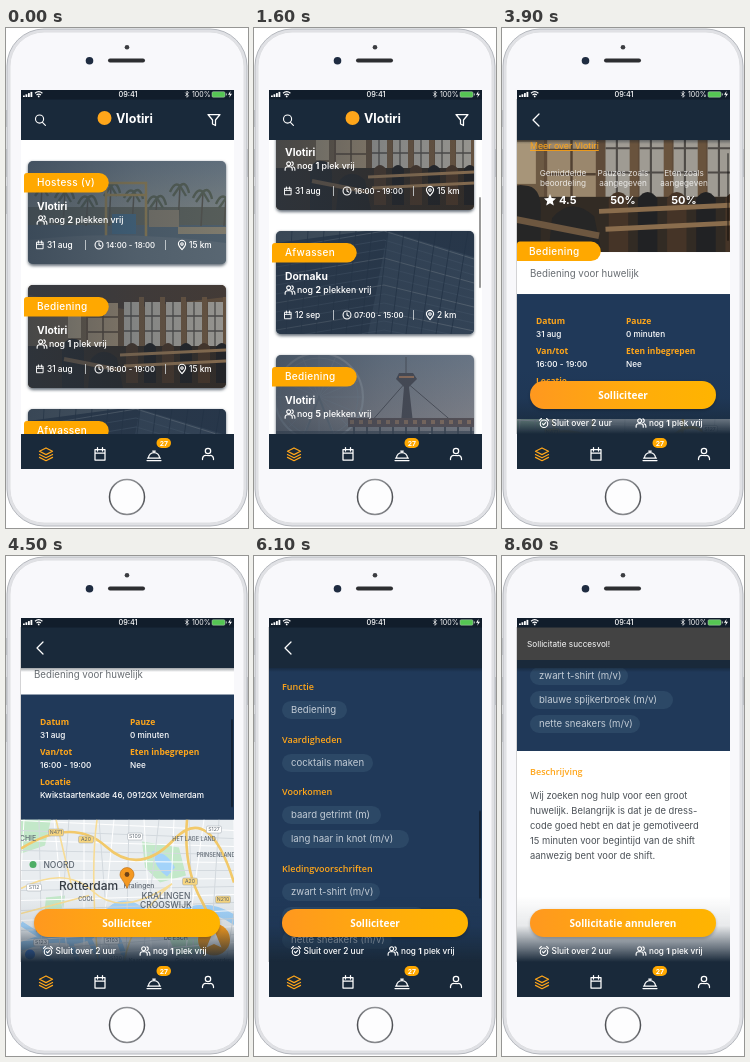
Recreate the animation shown at these times as an HTML page. Size 242 px wide and 500 px high, loop 8.7 s.

```html
<!DOCTYPE html>
<html lang="nl">
<head>
<meta charset="utf-8">
<title>Diensten-app</title>
<style>
@property --list { syntax: "<number>"; inherits: true; initial-value: 0; }
@property --page { syntax: "<number>"; inherits: true; initial-value: 0; }
html, body { margin: 0; width: 100%; height: 100%; overflow: hidden; background: #fff; }
svg { display: block; width: 242px; height: 500px; font: 400 8.3px Inter, sans-serif; fill: #fff;
  animation: list 8.7s linear infinite, page 8.7s linear infinite; }
.b { font-weight: 700; }
.m { font-weight: 500; }
.mid { text-anchor: middle; }
.line { fill: none; stroke: #fff; stroke-width: 1.2; stroke-linecap: round; stroke-linejoin: round; }
.orange { fill: #ffa800; }
.label { font: 700 8.5px "Open Sans", sans-serif; fill: #ffa61a; }
.head { font: 600 9px "Open Sans", sans-serif; fill: #ffa61a; }
.action { font: 700 10px "Open Sans", sans-serif; text-anchor: middle; }
.chip { font-size: 9.6px; fill: #c3ccd6; }
.prose { font-size: 9.4px; fill: #4b5157; }
.ribbon { font-size: 10px; font-weight: 500; letter-spacing: .3px; }
.place { fill: #5d6670; }
#cards { transform: translateY(calc(var(--list) * -1px)); }
#listBar { transform: translateY(calc(max(0, var(--list)) * .315px)); animation: listBar 8.7s linear infinite; }
#pageBar { transform: translateY(calc(var(--page) * .3px)); animation: pageBar 8.7s linear infinite; }
#scroll { transform: translateY(calc(var(--page) * -1px)); }
#detail { animation: enter 8.7s linear infinite; }
#apply { animation: apply 8.7s step-end infinite; }
#cancel { animation: cancel 8.7s step-end infinite; }
#press { animation: press 8.7s linear infinite; }
#toast { animation: toast 8.7s linear infinite; }
@keyframes list {
  0%, 2.3% { --list: 0; }
  6.9% { --list: 110; }
  11.5% { --list: 240; }
  14.94% { --list: 250; }
  18.39% { --list: 178; }
  22.99% { --list: 45; }
  26.44% { --list: -14; }
  27.59% { --list: -17; }
  29.9% { --list: -5; }
  31.5%, 100% { --list: 0; }
}
@keyframes page {
  0%, 41.38% { --page: 0; }
  44.83% { --page: 40; }
  49.43% { --page: 120; }
  54.02% { --page: 215; }
  59.77% { --page: 289; }
  63.22% { --page: 335; }
  70.11% { --page: 472; }
  74.71% { --page: 570; }
  79.31% { --page: 665; }
  82.8%, 100% { --page: 688; }
}
@keyframes listBar { 0%, 2.3% { opacity: 0; } 4%, 29% { opacity: 1; } 33%, 100% { opacity: 0; } }
@keyframes pageBar { 0%, 42% { opacity: 0; } 44%, 82% { opacity: 1; } 86%, 100% { opacity: 0; } }
@keyframes enter {
  0%, 34.48% { transform: translateX(214px); animation-timing-function: cubic-bezier(.2, .7, .3, 1); }
  39.1%, 100% { transform: none; }
}
@keyframes apply { 0% { opacity: 1; } 90.8%, 100% { opacity: 0; } }
@keyframes cancel { 0% { opacity: 0; } 90.8%, 100% { opacity: 1; } }
@keyframes press { 0%, 85% { opacity: 0; } 86.5%, 88% { opacity: .2; } 90.8%, 100% { opacity: 0; } }
@keyframes toast {
  0%, 90.7% { transform: translateY(-34px); animation-timing-function: ease-out; }
  94.3%, 100% { transform: none; }
}
</style>
</head>
<body>
<svg id="stage" viewBox="0 0 242 500"></svg>
<script>
const NAVY = '#19293a', BLUE = '#203959', BRAND = 'Vlotiri';

const range = (n, draw) => Array.from({ length: n }, (_, i) => draw(i)).join('');
const rect = (x, y, w, h, fill, more = '') => `<rect x="${x}" y="${y}" width="${w}" height="${h}" fill="${fill}" ${more}/>`;
const circle = (x, y, r, fill, more = '') => `<circle cx="${x}" cy="${y}" r="${r}" fill="${fill}" ${more}/>`;
const path = (d, more = 'class="line"') => `<path d="${d}" ${more}/>`;
const stroke = (d, color, width = 1) => path(d, `fill="none" stroke="${color}" stroke-width="${width}"`);
const text = (x, y, str, cls = '', more = '') => `<text x="${x}" y="${y}" class="${cls}" ${more}>${str}</text>`;
const group = (x, y, body, scale = 1, more = '') => `<g transform="translate(${x} ${y}) scale(${scale})" ${more}>${body}</g>`;
const bold = str => `<tspan font-weight="700">${str}</tspan>`;

// Icons are centred on their own origin.
const icons = {
  search: 'M3 3L6 6M4-1A4.5 4.5 0 1 1-5-1A4.5 4.5 0 1 1 4-1',
  filter: 'M-6-5.5H6L1.5 0V5.5L-1.5 4V0Z',
  back: 'M3-6L-3 0L3 6',
  calendar: 'M-5-4.5H5V6H-5ZM-5-1H5M-2.5-6.5V-3M2.5-6.5V-3',
  clock: 'M5.5 0A5.5 5.5 0 1 1-5.5 0A5.5 5.5 0 1 1 5.5 0M0-3V0L2.5 1.5',
  timer: 'M5 1A5 5 0 1 1-5 1A5 5 0 1 1 5 1M-2 1L-.5 2.5L2.2-.5M-6-3.5L-3.5-6M6-3.5L3.5-6',
  pin: 'M0 6.5C-3 3-5 1-5-1.5A5 5 0 0 1 5-1.5C5 1 3 3 0 6.5ZM1.7-1.5A1.7 1.7 0 1 1-1.7-1.5A1.7 1.7 0 1 1 1.7-1.5',
  users: 'M-6.5 5.5V4A3 3 0 0 1-3.5 1H0A3 3 0 0 1 3 4V5.5M.8-3A2.6 2.6 0 1 1-4.4-3A2.6 2.6 0 1 1 .8-3M2.5-5.5A2.6 2.6 0 0 1 2.5-.5M4.5 1.2A3 3 0 0 1 6.5 4V5.5',
  user: 'M-5.5 5.5V4.5A3.5 3.5 0 0 1-2 1.5H2A3.5 3.5 0 0 1 5.5 4.5V5.5M2.7-3A2.7 2.7 0 1 1-2.7-3A2.7 2.7 0 1 1 2.7-3',
  layers: 'M0-6L6.5-2.7L0 .6L-6.5-2.7ZM-6.5 .5L0 3.8L6.5 .5M-6.5 3.4L0 6.7L6.5 3.4',
  bell: 'M-6.5 3H6.5M-5.5 3A5.5 5.5 0 0 1 5.5 3M-7 5.5H7M0-2.5V-4M-1.3-4H1.3'
};
const icon = (name, x, y, scale = 1, color = '#fff') =>
  group(x, y, path(icons[name], `class="line" style="stroke:${color};stroke-width:${scale < .8 ? 1.5 : 1.25}"`), scale);

// Muted scenes, 198 by 103.
const pool = () => rect(0, 0, 198, 103, 'url(#sky)') +
  rect(0, 46, 198, 20, '#65695f') + rect(0, 64, 198, 39, '#596a76') +
  range(9, i => {
    const x = 12 + i * 23, y = 25 + i % 3 * 6;
    return stroke(`M${x} 65L${x + 2} ${y}`, '#5c584e', 1.5) +
      stroke(`M${x - 8} ${y + 6}Q${x - 3} ${y - 5} ${x + 2} ${y}Q${x + 8} ${y - 6} ${x + 11} ${y + 7}M${x - 5} ${y + 10}L${x + 2} ${y}L${x + 8} ${y + 10}`, '#5d6656', 2.4);
  }) +
  stroke('M78 82V22H118V82M78 34H118', '#a18a55', 2.5) +
  rect(84, 53, 24, 20, '#49708b') + rect(121, 49, 30, 17, '#8c8371') +
  path('M0 79Q90 68 198 82V103H0Z', 'fill="#687680"') + rect(150, 66, 48, 7, '#9a9078');

const room = () => rect(0, 0, 198, 103, '#6b5138') + path('M0 0H198V12L96 24L0 10Z', 'fill="#4b3b30"') +
  rect(0, 12, 58, 60, '#7c6345') + rect(60, 18, 30, 44, '#b39a78') +
  range(5, i => rect(96 + i * 21, 17, 15, 44, '#b9b2a6') + rect(111 + i * 21, 12, 5, 52, '#775a3d') +
    stroke(`M${103 + i * 21} 17V61M${96 + i * 21} 31H${111 + i * 21}M${96 + i * 21} 46H${111 + i * 21}`, '#564f48', 1.3)) +
  stroke('M75 18V62M60 32H90M60 47H90', '#5a4430', 1.5) +
  rect(40, 27, 13, 26, '#c3ab86') + rect(0, 61, 198, 42, '#34291f') +
  path('M34 103V66Q36 52 46 54Q57 54 56 72V103ZM60 103L63 74Q75 60 89 73L95 103Z', 'fill="#262321"') +
  range(6, i => path(`M${98 + i * 18} 98V62Q${104 + i * 18} 54 ${110 + i * 18} 62V98`, `fill="${i % 2 ? '#201e1e' : '#4b3422'}"`)) +
  stroke('M92 70L198 65M96 81L198 76', '#a07a50', 3) + stroke('M36 74L92 85', '#7c5f41', 4);

const office = () => rect(0, 0, 198, 103, '#52606d') + path('M0 12L90 0H198V103H0Z', 'fill="#26364a"') +
  path('M112 0L198 26V103H92Z', 'fill="#35465a"') +
  range(12, i => stroke(`M0 ${18 + i * 9}L108 ${i * 9}L198 ${28 + i * 8}`, i % 3 ? '#45566a' : '#677480', .8)) +
  range(13, i => stroke(`M${i * 16} 0L${i * 15 - 5} 103`, '#203044', .8));

const pier = () => rect(0, 0, 198, 103, 'url(#dusk)') +
  circle(43, 42, 44, 'none', 'stroke="#a3aab3" stroke-width="2"') + circle(43, 42, 39, 'none', 'stroke="#8b95a0"') +
  range(16, i => {
    const a = i * Math.PI / 8;
    return stroke(`M43 42L${43 + 43 * Math.cos(a)} ${42 + 43 * Math.sin(a)}`, '#929ba6', .7);
  }) +
  stroke('M20 103L43 42L66 103', '#7c8590', 2) +
  stroke('M130 2V20M94 68L130 27L178 68', '#55565e') +
  path('M125 68L128 32L120 24L123 18H137L141 24L133 32L137 68Z', 'fill="#51515a"') +
  stroke('M123 22H138', '#b08062', 2) +
  rect(72, 63, 126, 9, '#60565a') + range(14, i => rect(74 + i * 9, 65, 4, 4, '#957966')) +
  range(10, i => stroke(`M${78 + i * 13} 72V86`, '#39424f', 1.5)) + path('M0 76H198V103H0Z', 'fill="#3c4856" opacity=".65"');

const ribbon = (x, y, w, str, textX) =>
  path(`M${x} ${y + 3}Q${x} ${y} ${x + 3} ${y}H${x + w - 10}A9.5 9.5 0 0 1 ${x + w - 10} ${y + 19.5}H${x}Z`, 'class="orange"') +
  text(textX, y + 13, str, 'ribbon');

const jobs = [
  ['Hostess (v)', BRAND, 2, '31 aug', '14:00 - 18:00', 15, pool],
  ['Bediening', BRAND, 1, '31 aug', '16:00 - 19:00', 15, room],
  ['Afwassen', 'Dornaku', 2, '12 sep', '07:00 - 15:00', 2, office],
  ['Bediening', BRAND, 5, '14 sep', '17:00 - 23:00', 15, pier],
  ['Bediening', BRAND, 3, '15 sep', '16:00 - 22:00', 15, room]
];
const spots = n => `nog ${bold(n)} ${n > 1 ? 'plekken' : 'plek'} vrij`;
const card = ([role, firm, free, day, hours, km, scene], i) => group(0, 133 + i * 124,
  rect(22, 1, 198, 104, '#68717a', 'rx="5" filter="url(#soft)"') +
  group(22, 0, scene() + rect(0, 0, 198, 103, 'url(#shade)'), 1, 'clip-path="url(#cardClip)"') +
  ribbon(18, 12, 85, role, 31) +
  text(31, 49, firm, 'b', 'font-size="10.3"') +
  icon('users', 36, 59, .75) + text(43, 62, spots(free), 'm', 'font-size="8.8"') +
  icon('calendar', 34, 84, .62) + text(41, 87, day, 'm') +
  icon('clock', 93, 84, .72) + text(100, 87, hours, 'm', 'font-size="7.8"') +
  icon('pin', 176, 84, .72) + text(183, 87, km + ' km', 'm') +
  stroke('M79.5 79V89M159.5 79V89', '#d7dce0', .8));

const scrollbar = (id, height) => `<g id="${id}">${rect(225, 113, 2, height, '#000', 'rx="1" opacity=".4"')}</g>`;
const header = rect(15, 71, 213, 41, NAVY);
const listView = rect(15, 112, 213, 294, '#fff') +
  `<g id="cards">${jobs.map(card).join('')}</g>` + scrollbar('listBar', 91) +
  header + icon('search', 34, 92, .9) + icon('filter', 208, 92) +
  circle(98.5, 90, 7, '#ffa61a') + text(110, 94.5, BRAND, 'b', 'font-size="12.5"');

const roads = [[50, 155, 'N471'], [129, 159, 'S109'], [80, 162, 'A20'], [208, 152, 'S127'], [184, 204, 'A20'],
  [217, 222, 'N210'], [28, 210, 'S112'], [106, 263, 'S103'], [35, 265, 'S123'], [110, 281, 'S120']];
const places = [
  [22, 163, 'CHIE', 7], [53, 190, 'NOORD', 8.5], [188, 163, 'HET LAGE LAND', 5.5], [210, 179, 'PRINSENLAND', 5.5],
  [133, 210, 'Kralingen', 6.8], [160, 221, 'KRALINGEN', 8.5], [160, 230, 'CROOSWIJK', 8.5], [80, 223, 'COOL', 5.5],
  [128, 243, 'Erasmusbrug', 7.4], [43, 254, 'Uitzicht', 7.4], [170, 262, 'DE ESCH', 5.5]
];
// Map spans y 142 to 285 in its own frame.
const map = `<g clip-path="url(#mapClip)">` + rect(15, 142, 213, 143, '#e9edf0') +
  path('M15 142H45L39 168L15 176ZM136 164L173 170L180 198L154 205L139 190ZM160 253L194 249L203 273L172 282ZM40 220L59 218L57 234L38 238Z', 'fill="#c3e8c9"') +
  path('M146 174Q160 173 169 190L161 199Q149 191 146 174Z', 'fill="#a3d3fa"') +
  stroke('M12 271Q39 257 65 262Q89 261 98 242Q113 220 132 232Q151 247 171 240Q199 222 231 244', '#a3d3fa', 9) +
  stroke('M64 263L72 285M102 246Q116 262 119 285M35 265L45 285M80 255L95 285M15 246L40 262', '#a3d3fa', 5) +
  range(16, i => stroke(`M15 ${143 + i * 10}L228 ${153 + i * 8}M${18 + i * 15} 142L${10 + i * 14 + i % 3 * 12} 285`, i % 2 ? '#d3d9de' : '#fff', 1)) +
  stroke('M15 171Q67 139 100 169T168 162T228 205M181 142Q177 191 196 224T193 285', '#f2c96a', 2.6) +
  stroke('M15 211Q59 188 87 214T165 207M91 142Q84 190 92 285M15 236L83 218M50 142L66 210M118 285Q126 240 166 206', '#f7dc96', 1.6) +
  roads.map(([x, y, s]) => rect(x - 7.5, y - 3.5, 15, 7, s[0] === 'S' ? '#fff' : '#f7d57e', 'rx="1.5" stroke="#9ba3aa" stroke-width=".5"') +
    text(x, y + 1.9, s, 'mid', 'font-size="5.2" style="fill:#59636d"')).join('') +
  places.map(([x, y, s, size]) => text(x, y, s, 'place mid m', `font-size="${size}"`)).join('') +
  text(53, 212, 'Rotterdam', 'm', 'font-size="12" style="fill:#343b43"') +
  circle(99, 239, 4, '#60a7b6') + circle(65, 250, 4, '#60a7b6') + circle(27, 187, 3.5, '#4fae65') +
  circle(24, 277, 5, '#4285f4') +
  rect(120, 279, 108, 6, '#f1f3f4', 'opacity=".8"') +
  text(123, 284, 'Kaartgegevens', '', 'font-size="5.4" style="fill:#222"') +
  text(169, 284, 'Gebruiksvoorwaarden', '', 'font-size="5.4" style="fill:#222"') +
  path('M121 211C118 203 114 201 114 197A7 7 0 0 1 128 197C128 201 124 203 121 211Z', 'fill="#f49820" stroke="#b86b13" stroke-width=".6"') +
  circle(121, 197, 2.4, '#6c4219') +
  circle(208, 262, 16.5, '#fff', 'opacity=".35"') + circle(208, 262, 16, '#ff9f1c') +
  path('M208 252L215.5 270L208 266.5L200.5 270Z', 'fill="#fff"') + '</g>';

const chipGroups = [
  [603, 'Functie', ['Bediening']],
  [656, 'Vaardigheden', ['cocktails maken']],
  [708, 'Voorkomen', ['baard getrimt (m)', 'lang haar in knot (m/v)']],
  [785, 'Kledingvoorschriften', ['zwart t-shirt (m/v)', 'blauwe spijkerbroek (m/v)', 'nette sneakers (m/v)']]
];
const chipWidths = { 'Bediening': 65, 'cocktails maken': 91, 'baard getrimt (m)': 99, 'lang haar in knot (m/v)': 127,
  'zwart t-shirt (m/v)': 98, 'blauwe spijkerbroek (m/v)': 143, 'nette sneakers (m/v)': 110 };
const chips = chipGroups.map(([y, title, items]) => text(28, y + 3, title, 'head') +
  items.map((s, i) => rect(28, y + 14 + i * 24, chipWidths[s], 18, '#2c4866', 'rx="9"') +
    text(37, y + 26.3 + i * 24, s, 'chip')).join('')).join('');

const facts = [[34, 333, 'Datum', '31 aug'], [124, 333, 'Pauze', '0 minuten'], [34, 363, 'Van/tot', '16:00 - 19:00'],
  [124, 363, 'Eten inbegrepen', 'Nee'], [34, 393, 'Locatie', 'Kwikstaartenkade 46, 0912QX Velmerdam']];
const scores = [[61, 'Gemiddelde', 'beoordeling', ''], [121, 'Pauzes zoals', 'aangegeven', '50%'], [182, 'Eten zoals', 'aangegeven', '50%']];
const prose = ['Wij zoeken nog hulp voor een groot', 'huwelijk. Belangrijk is dat je de dress-',
  'code goed hebt en dat je gemotiveerd', '15 minuten voor begintijd van de shift', 'aanwezig bent voor de shift.'];

const hero = `<g clip-path="url(#heroClip)">` + group(-52, 110, room(), 1.62) + rect(15, 110, 213, 154, '#27323d', 'opacity=".18"') + '</g>' +
  text(28, 141, BRAND, 'b', 'font-size="14"') +
  text(28, 161, 'Meer over ' + BRAND, '', 'style="fill:#ffa61a;text-decoration:underline;font-size:8.8px"') +
  scores.map(([x, a, b, v]) => text(x, 187.5, a, 'mid', 'font-size="8.2" opacity=".8"') +
    text(x, 197.5, b, 'mid', 'font-size="8.2" opacity=".8"') + text(x, 216, v, 'mid b', 'font-size="11"')).join('') +
  text(57, 216, '4.5', 'b', 'font-size="11"') +
  path('M48 206L49.7 210L54 210.4L50.8 213.2L51.8 217.5L48 215.2L44.2 217.5L45.2 213.2L42 210.4L46.3 210Z', 'fill="#fff"');

const body = hero + rect(15, 264, 213, 43, '#fff') + ribbon(15, 253.5, 84, 'Bediening', 27) +
  text(28, 289, 'Bediening voor huwelijk', '', 'font-size="9.7" style="fill:#686d72"') +
  rect(15, 306, 213, 577, BLUE) +
  facts.map(([x, y, a, b]) => text(x, y + 3, a, 'label') + text(x, y + 16, b, 'm', 'font-size="8.2"')).join('') +
  group(0, 289, map) + chips +
  rect(15, 883, 213, 230, '#fff') + text(28, 907, 'Beschrijving', 'head') +
  prose.map((s, i) => text(28, 931.3 + i * 15, s, 'prose')).join('');

const detailView = rect(14, 71, 2, 335, '#000', 'opacity=".15"') + rect(15, 112, 213, 294, BLUE) +
  `<g id="scroll">${body}</g>` + scrollbar('pageBar', 88) +
  rect(15, 112, 213, 4, 'url(#drop)') + header + icon('back', 34, 92) +
  rect(15, 340, 213, 66, 'url(#fade)') +
  rect(28, 354.5, 186, 28, '#000', 'rx="14" opacity=".22" filter="url(#soft)"') +
  rect(28, 353, 186, 28, 'url(#gold)', 'rx="14"') + rect(28, 353, 186, 28, '#fff', 'rx="14" id="press"') +
  text(121, 370.5, 'Solliciteer', 'action', 'id="apply"') +
  text(121, 370.5, 'Sollicitatie annuleren', 'action', 'id="cancel"') +
  icon('timer', 42, 395, .75) + text(49.5, 398, 'Sluit over 2 uur', 'm', 'font-size="8.4"') +
  icon('users', 139, 395, .75) + text(147, 398, spots(1), 'm', 'font-size="8.2"') +
  `<g id="toast">${rect(15, 71, 213, 33, '#434343')}${text(25, 91, 'Sollicitatie succesvol!', '', 'font-size="8.2"')}</g>`;

const nav = rect(15, 406, 213, 35, NAVY) + icon('layers', 40, 426, 1, '#ffa61a') + icon('calendar', 94, 426) +
  icon('bell', 148, 427) + icon('user', 202, 426) +
  rect(150.5, 410, 14.5, 10, '#ffa800', 'rx="5"') + text(157.8, 417.6, '27', 'mid b', 'font-size="6.8"');

const status = rect(15, 62, 213, 9.5, '#111d2b') +
  range(4, i => rect(17 + i * 2.5, 67.5 - i * 1.2, 1.8, 1.5 + i * 1.2, '#fff')) +
  stroke('M29 65.2Q32.7 62 36.4 65.2M30.5 67Q32.7 65.2 34.9 67', '#fff', 1.2) + circle(32.7, 68.4, .9, '#fff') +
  text(122, 69, '09:41', 'mid m', 'font-size="7.3"') +
  stroke('M179.3 64.6L182.5 67.8L181 69.3V63.2L182.5 64.7L179.3 67.9', '#fff', .7) +
  text(186, 69, '100%', '', 'font-size="7"') +
  rect(206, 63.7, 13, 5.5, '#55c653', 'rx="1.2" stroke="#b7c5bb" stroke-width=".5"') + rect(219.8, 65.4, 1, 2, '#b7c5bb') +
  path('M224.5 63L222 66.8H224L223.2 69.7L226 65.8H224Z', 'fill="#fff"');

const sideButtons = [[0, 82, 17], [0, 121, 28], [0, 158, 28], [240, 121, 28]];
const phone = sideButtons.map(([x, y, h]) => rect(x, y, 2, h, '#c7c9cc')).join('') +
  rect(1, 1, 240, 497, '#e0e1e5', 'rx="37" stroke="#b5b8be" stroke-width="1"') +
  rect(4, 4, 234, 491, '#f8f8fb', 'rx="34" stroke="#dedfe2" stroke-width="1"') +
  circle(121, 19.3, 2.3, '#3b3d41') + rect(102, 30.6, 37, 4, '#2d2e31', 'rx="2"') + circle(83.5, 32.8, 3.8, '#1f2c41') +
  circle(121, 469, 17.5, '#fdfdfe', 'stroke="url(#ring)" stroke-width="1.5"');

const stops = list => list.map(([o, c, a = 1]) => `<stop offset="${o}" stop-color="${c}" stop-opacity="${a}"/>`).join('');
const gradient = (id, vertical, list) =>
  `<linearGradient id="${id}" x2="${vertical ? 0 : 1}" y2="${vertical ? 1 : 0}">${stops(list)}</linearGradient>`;
const clip = (id, x, y, w, h, r = 0) => `<clipPath id="${id}">${rect(x, y, w, h, '#000', `rx="${r}"`)}</clipPath>`;
const defs = '<defs>' +
  gradient('sky', true, [[0, '#71808d'], [.55, '#929792'], [1, '#69747c']]) +
  gradient('dusk', true, [[0, '#7b8898'], [.6, '#949399'], [1, '#626b76']]) +
  gradient('shade', false, [[0, '#2b3949', .65], [.55, '#2b3949', .38], [1, '#2b3949', .25]]) +
  gradient('gold', false, [[0, '#ff981f'], [.6, '#ffad0a'], [1, '#ffb400']]) +
  gradient('fade', true, [[0, NAVY, 0], [.45, NAVY, .1], [.8, NAVY, .66], [1, NAVY, 1]]) +
  gradient('drop', true, [[0, '#0c1722', .4], [1, '#0c1722', 0]]) +
  gradient('ring', true, [[0, '#8e9094'], [.5, '#4c4e52'], [1, '#85878b']]) +
  clip('screen', 14, 62, 214, 379) + clip('cardClip', 0, 0, 198, 103, 5) +
  clip('mapClip', 15, 142, 213, 143) + clip('heroClip', 15, 110, 213, 154) +
  '<filter id="soft" x="-10%" y="-20%" width="120%" height="140%"><feGaussianBlur stdDeviation="1.5"/></filter></defs>';

document.getElementById('stage').innerHTML = defs + phone +
  `<g clip-path="url(#screen)">${listView}<g id="detail">${detailView}</g>${nav}${status}</g>`;

// The picture advances ten times a second.
const motions = document.getAnimations();
motions.forEach(m => m.pause());
const start = performance.now();
function tick() {
  const time = Math.floor((performance.now() - start) % 8700 / 100) * 100;
  motions.forEach(m => { m.currentTime = time; });
  requestAnimationFrame(tick);
}
tick();
</script>
</body>
</html>
```
